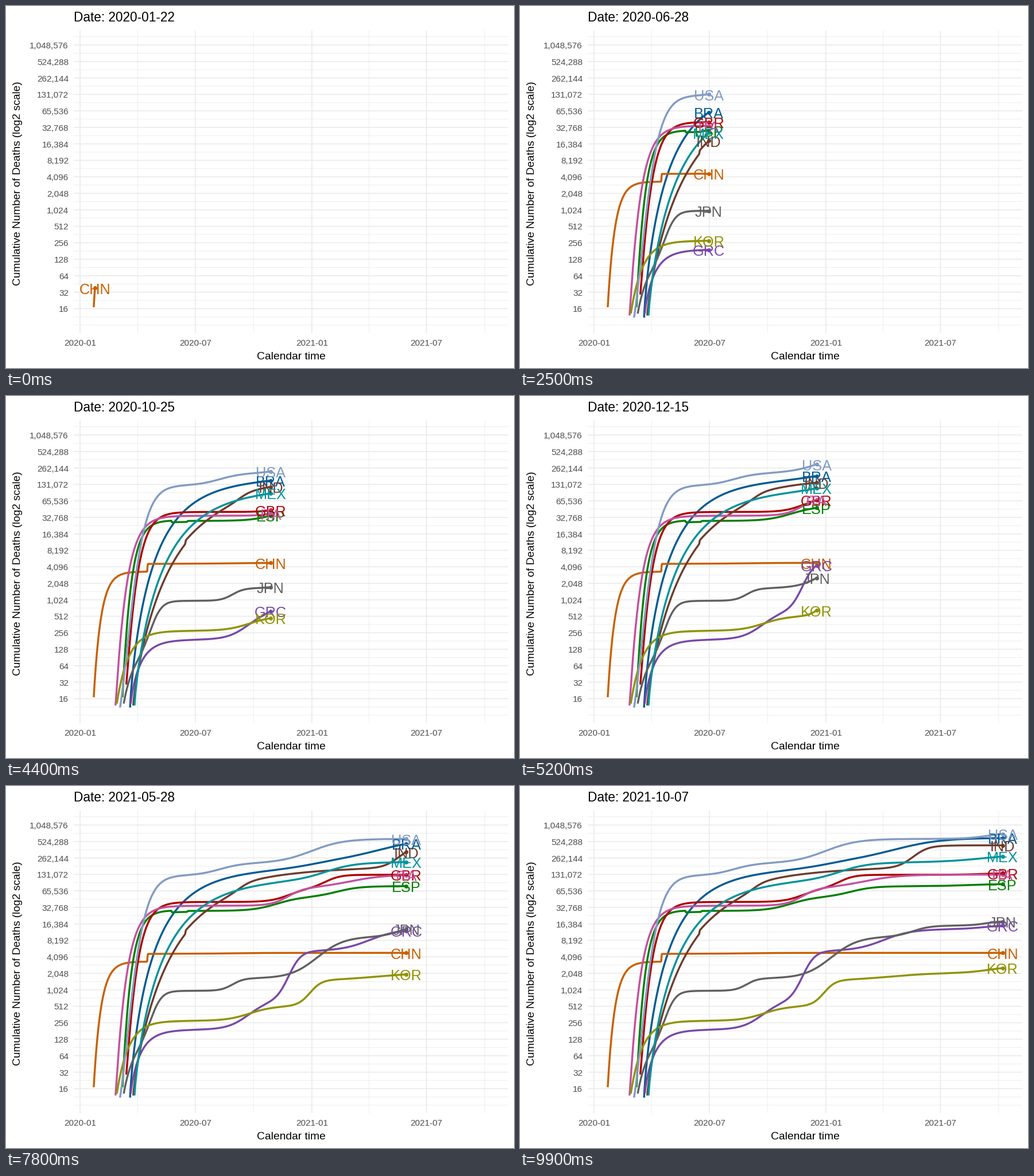
A matplotlib script that plays this animation: 885x632 px, repeating every 10000 ms.

```python
import numpy as np
import matplotlib.pyplot as plt
from matplotlib.animation import FuncAnimation

W, H, DPI = 885, 632, 100
FRAMES, INTERVAL = 100, 100
PX = 72 / DPI                        # points per pixel
LEFT, RIGHT, TOP, BOTTOM = 118, 875, 43, 571
Y16, DOUBLING = 528.4, 28.77         # height of 16, pixels per doubling
JAN, DAY = 129.0, 1.1033             # x of 2020-01-01, pixels per day
START, SPAN = np.datetime64("2020-01-22"), 624
FIRST, LAST, LEAD = 21, 645, 2.5     # days since 2020-01-01
GRID, TICK = "#EBEBEB", "#4D4D4D"

plt.rcParams["font.family"] = "Liberation Sans"
plt.rcParams["path.snap"] = False

fig = plt.figure(figsize=(W / DPI, H / DPI), dpi=DPI, facecolor="white")
ax = fig.add_axes([0, 0, 1, 1])
ax.set_xlim(0, W)
ax.set_ylim(H, 0)
ax.axis("off")


def to_x(day):
    return JAN + DAY * day


def to_y(power):
    return Y16 - DOUBLING * (power - 4)


def write(x, y, s, px, color="black", **kw):
    return ax.text(x, y, s, fontsize=px * PX, color=color, va="baseline", **kw)


def rule(xs, ys, width):
    ax.plot(xs, ys, color=GRID, lw=width * PX, solid_capstyle="butt", zorder=1)


def hline(power, width):
    rule([LEFT, RIGHT], [to_y(power)] * 2, width)


def vline(day, width):
    rule([to_x(day)] * 2, [TOP, BOTTOM], width)


def draw_axes():
    hline(3, 0.85)
    for p in range(4, 21):
        hline(p - 0.5, 0.85)
        hline(p, 1.7)
        write(109, to_y(p) + 5.9, f"{2 ** p:,}", 15.2, TICK, ha="right")
    hline(20.5, 0.85)

    months = np.arange("2020-01", "2022-02", 6, dtype="datetime64[M]")
    days = (months.astype("datetime64[D]") - np.datetime64("2020-01-01")).astype(int)
    for month, a, b in zip(months, days, days[1:]):
        vline((a + b) / 2, 0.85)
        vline(a, 1.7)
        write(to_x(a), 593, str(month), 15.3, TICK, ha="center")

    write(496.5, 617.4, "Calendar time", 19.3, ha="center")
    write(24.6, 309.5, "Cumulative Number of Deaths (log2 scale)", 19.05,
          ha="center", rotation=90, rotation_mode="anchor")


def logistic(t):
    return 0.5 + 0.5 * np.tanh(t / 2)


class Country:
    """First wave saturates on the log scale; later ones are logistic.

    first = (start day, starting count, plateau, time scale, shape)
    waves = (size, middle day, width), ...
    """

    def __init__(self, name, color, first, *waves):
        self.first, self.waves = first, waves
        self.days = np.arange(first[0], LAST, 0.5)
        self.xs, self.ys = to_x(self.days), self.curve(self.days)
        self.line, = ax.plot([], [], color=color, lw=3.4 * PX, zorder=3,
                             solid_capstyle="butt", solid_joinstyle="round")
        self.dot, = ax.plot([], [], "o", color=color, ms=7 * PX, mew=0, zorder=4)
        self.label = write(0, 0, name, 25.2, color, ha="center", zorder=5)

    def curve(self, day):
        start, count, plateau, scale, shape = self.first
        gap = np.exp(-((day - start) / scale) ** shape)
        deaths = plateau * (count / plateau) ** gap
        for size, mid, width in self.waves:
            deaths = deaths + size * (logistic((day - mid) / width)
                                      - logistic((start - mid) / width))
        return to_y(np.log2(deaths))

    def reveal(self, head):
        shown = head >= self.days[0]
        for artist in (self.line, self.dot, self.label):
            artist.set_visible(shown)
        if shown:
            x, y = to_x(head), self.curve(head)
            n = np.searchsorted(self.days, head)
            self.line.set_data(np.append(self.xs[:n], x), np.append(self.ys[:n], y))
            self.dot.set_data([x], [y])
            self.label.set_position((x, y + 10.4))


draw_axes()
title = write(118, 27, "", 22.6)

countries = [
    Country("BRA", "#005B94", (79, 11, 170e3, 38, 0.82),
            (70e3, 375, 28), (370e3, 494, 36)),
    Country("CHN", "#C86000", (21.6, 17, 3350, 11.5, 1),
            (1290, 106.5, 0.15), (200, 230, 30)),
    Country("ESP", "#007F00", (67, 17, 29e3, 13.5, 1.03),
            (-1900, 144.6, 0.15), (1200, 169.5, 0.3),
            (22.5e3, 316, 19), (29e3, 410, 18), (8e3, 590, 25)),
    Country("GBR", "#B00000", (73, 29, 41.2e3, 17.5, 1.1),
            (32e3, 334, 15), (56e3, 391, 12), (12e3, 625, 25)),
    Country("GRC", "#7848A8", (80, 13, 192, 16, 0.9),
            (450, 275, 16), (4600, 339, 9), (7800, 467, 22), (3300, 627, 22)),
    Country("IND", "#6E3B2C", (84, 12, 152e3, 62, 0.85),
            (1500, 166.5, 0.2), (27e3, 256, 9), (268e3, 509.5, 12)),
    Country("ITA", "#C4509E", (56, 12, 35.1e3, 17.5, 1.05),
            (38e3, 333, 13), (57e3, 434, 28)),
    Country("JPN", "#606060", (69, 13, 92, 14, 1),
            (890, 121, 8), (680, 243, 9), (7900, 392, 20),
            (5700, 507, 14), (3200, 620, 12)),
    Country("KOR", "#8F9300", (58, 13, 278, 18.5, 1),
            (230, 273, 18), (1020, 368, 9), (560, 475, 35), (700, 630, 20)),
    Country("MEX", "#00939B", (86, 12, 114e3, 46, 0.83),
            (105e3, 398, 22), (95e3, 625, 35)),
    Country("USA", "#829BC3", (63, 11, 125e3, 27, 1.4),
            (85e3, 225, 18), (375e3, 378, 25), (180e3, 625, 18)),
]


def update(i):
    elapsed = i * SPAN / (FRAMES - 1)
    title.set_text(f"Date: {START + np.timedelta64(round(elapsed), 'D')}")
    head = min(FIRST + LEAD + elapsed, LAST)
    for country in countries:
        country.reveal(head)
    return []


anim = FuncAnimation(fig, update, frames=FRAMES, interval=INTERVAL,
                     repeat=True, repeat_delay=0, blit=False)
plt.show()
```
